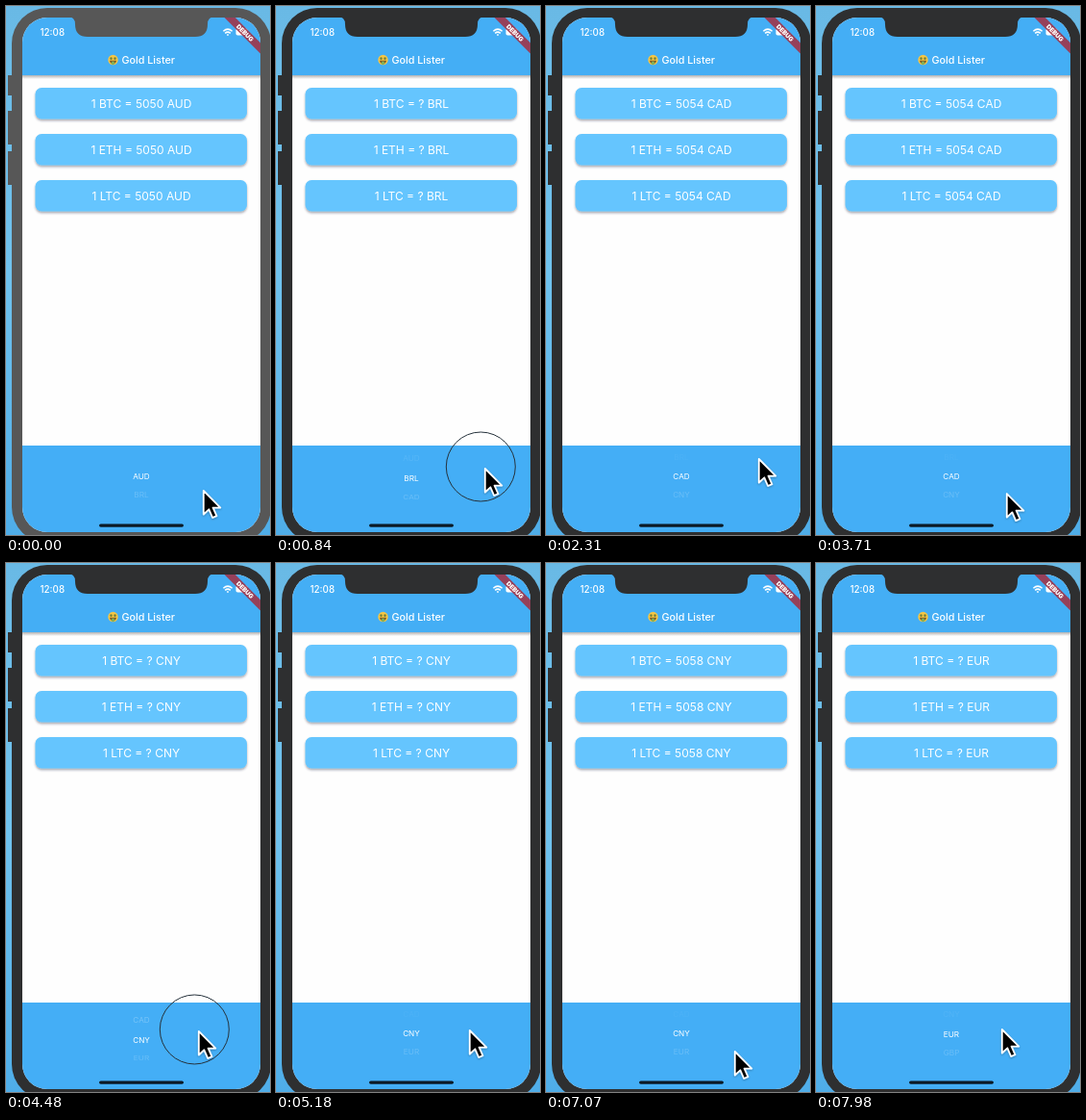
Recreate the animation shown at these times as an HTML page. Size 275 by 550 pixels, loop 8 s.

```html
<!DOCTYPE html>
<html lang="en">
<head>
<meta charset="utf-8">
<title>Currency picker</title>
<style>
  html, body { margin: 0; width: 100%; height: 100%; overflow: hidden; background: #5fb6e8; }
  svg { display: block; width: 100vw; height: 100vh; }
  text { font-family: Inter, Roboto, sans-serif; fill: #fff; text-anchor: middle; }
</style>
</head>
<body>
<svg viewBox="0 0 275 550" preserveAspectRatio="xMidYMid meet">
  <defs>
    <linearGradient id="desk" x2="0" y2="1">
      <stop stop-color="#69b9e5"/><stop offset=".5" stop-color="#70c2ed"/><stop offset="1" stop-color="#4fade8"/>
    </linearGradient>
    <linearGradient id="barShade" x2="0" y2="1">
      <stop stop-color="#000" stop-opacity=".3"/><stop offset="1" stop-color="#000" stop-opacity="0"/>
    </linearGradient>
    <filter id="soft" x="-10%" y="-30%" width="120%" height="180%">
      <feDropShadow dx="0" dy="1.7" stdDeviation="1.2" flood-color="#334" flood-opacity=".42"/>
    </filter>
    <filter id="cursorShade" x="-40%" y="-20%" width="190%" height="160%">
      <feDropShadow dx="0" dy="1" stdDeviation="1" flood-opacity=".3"/>
    </filter>
    <clipPath id="screen"><rect x="17" y="12" width="248" height="535" rx="26"/></clipPath>
  </defs>

  <rect width="275" height="550" fill="url(#desk)"/>
  <g id="body">
    <path d="M2 72h5v21h-5zM2 109h5v35h-5zM2 151h5v35h-5z"/>
    <rect x="6" y="2" width="270" height="556" rx="37"/>
  </g>

  <g clip-path="url(#screen)">
    <rect x="17" y="12" width="248" height="535" fill="#fefefe"/>
    <rect x="17" y="72" width="248" height="4" fill="url(#barShade)"/>
    <rect x="17" y="12" width="248" height="60" fill="#44aef5"/>
    <rect x="17" y="457" width="248" height="90" fill="#44aef6"/>

    <text x="48.3" y="30.8" font-size="9.8" font-weight="500">12:08</text>
    <g fill="none" stroke="#fff" stroke-width="1.5">
      <path d="M226.4 26.2q4.6-4.2 9.2 0M228.2 28.4q2.8-2.5 5.6 0"/>
      <circle cx="231" cy="30" r=".6" fill="#fff" stroke-width=".7"/>
    </g>
    <rect x="239.5" y="23.5" width="12" height="7" rx="1.8" fill="#fff"/>

    <g transform="translate(265 12) rotate(45)">
      <rect x="-27" y="18.5" width="54" height="8" fill="#a32f42" fill-opacity=".86"/>
      <text x="0" y="24.9" font-size="6.4" font-weight="900">DEBUG</text>
    </g>

    <g transform="translate(111.5 56)">
      <circle r="5.2" fill="#f7c744"/>
      <path d="M-3.4 .8h6.8q-.5 3.3-3.4 3.3t-3.4-3.3z" fill="#7a4a1c"/>
      <path d="M-1.7 1.6h3.4v2.7q-1.7 1.3-3.4 0z" fill="#7fae58"/>
      <circle cx="-2" cy="-1.4" r="1.3" fill="#77833a"/>
      <circle cx="2" cy="-1.4" r="1.3" fill="#77833a"/>
    </g>
    <text x="148.2" y="59.8" font-size="10.8" font-weight="500">Gold Lister</text>

    <g id="cards"></g>
    <g id="wheel"></g>
    <rect x="97" y="538.4" width="88" height="3.4" rx="1.7" fill="#0b1a26"/>
  </g>

  <path id="notch" d="M64 11q8 0 8 8q0 13 13 13h112q13 0 13-13q0-8 8-8z"/>
  <circle id="ring" r="36" fill="none" stroke="#26323c" stroke-width="1"/>
  <path id="cursor" d="M0 0V24.5L5.6 19.3L9.4 28L13.6 26.2L9.8 17.6H17.5Z" fill="#000"
    stroke="#fff" stroke-width="1.8" stroke-linejoin="round" filter="url(#cursorShade)"/>
</svg>

<script>
const LOOP = 8000, STEP = 70;
const COINS = ["BTC", "ETH", "LTC"];
const CODES = ["AUD", "BRL", "CAD", "CNY", "EUR", "GBP"];

// Key points: time, then values
const CURSOR = [
  [0, 205, 503], [300, 206, 502], [840, 217, 480], [1150, 221, 470], [2500, 221, 470],
  [3300, 198, 507], [3780, 198, 506], [4400, 200, 486], [5200, 201, 485],
  [6300, 201, 485], [6900, 196, 507], [7080, 196, 507], [7650, 193, 484]
];
const SCROLL = [
  [350, 0], [840, .92], [1150, 1.4], [1500, 2], [3800, 2], [4450, 2.65],
  [4700, 2.7], [5000, 3], [7100, 3], [7650, 3.75], [7980, 3.96]
];
const PRESSES = [[300, 1150], [3800, 4700], [7080, 7750]];
const PRICES = [[0, 0, 5050], [2, 1900, 5054], [3, 5300, 5058]]; // code index, shown from, value

const $ = id => document.getElementById(id);

function add(parent, tag, attrs) {
  const el = document.createElementNS("http://www.w3.org/2000/svg", tag);
  for (const k in attrs) el.setAttribute(k, attrs[k]);
  return parent.appendChild(el);
}

function track(keys, t) {
  if (t <= keys[0][0]) return keys[0].slice(1);
  for (let i = 1; i < keys.length; i++) {
    const [a, ...from] = keys[i - 1], [b, ...to] = keys[i];
    if (t > b) continue;
    const u = (t - a) / (b - a), e = u * u * (3 - 2 * u);
    return from.map((v, j) => v + (to[j] - v) * e);
  }
  return keys[keys.length - 1].slice(1);
}

const rows = COINS.map((_, i) => {
  const y = 85 + 48 * i;
  add($("cards"), "rect", { x: 30.5, y, width: 220.5, height: 32.5, rx: 6.5, fill: "#65c5fe", filter: "url(#soft)" });
  return add($("cards"), "text", { x: 141, y: y + 20.6, "font-size": 12 });
});

const items = CODES.map(code => {
  const el = add($("wheel"), "text", { "font-size": 8.2, y: 3 });
  el.textContent = code;
  return el;
});

function drawWheel(pos) {
  items.forEach((el, i) => {
    const angle = (i - pos) * .55, d = 38 * Math.sin(angle);
    let alpha = 0;
    if (Math.abs(angle) < 1) {
      if (Math.abs(d) < 10) alpha = 1;
      else alpha = d > 0 ? .2 : Math.max(0, .28 - (-d - 13) * .035);
    }
    el.setAttribute("transform", `translate(141 ${489 + d}) scale(1 ${Math.cos(angle)})`);
    el.setAttribute("opacity", alpha);
  });
}

function draw(t) {
  const [x, y] = track(CURSOR, t), [pos] = track(SCROLL, t);
  const pick = Math.round(pos);
  const quote = PRICES.find(([i, from]) => i === pick && t >= from);
  rows.forEach((el, i) => {
    el.textContent = `1 ${COINS[i]} = ${quote ? quote[2] : "?"} ${CODES[pick]}`;
  });
  drawWheel(pos);

  const shell = t < PRESSES[0][0] ? "#575757" : "#2e2f30";
  $("body").setAttribute("fill", shell);
  $("notch").setAttribute("fill", shell);

  const down = PRESSES.some(([a, b]) => t >= a && t < b);
  $("ring").setAttribute("visibility", down ? "visible" : "hidden");
  $("ring").setAttribute("transform", `translate(${x - 3.7} ${y - 1})`);
  $("cursor").setAttribute("transform", `translate(${x + .8} ${y + 1})`);
}

const start = performance.now();
function frame() {
  const t = (performance.now() - start) % LOOP;
  draw(Math.floor(t / STEP) * STEP);
  requestAnimationFrame(frame);
}
frame();
</script>
</body>
</html>
```
